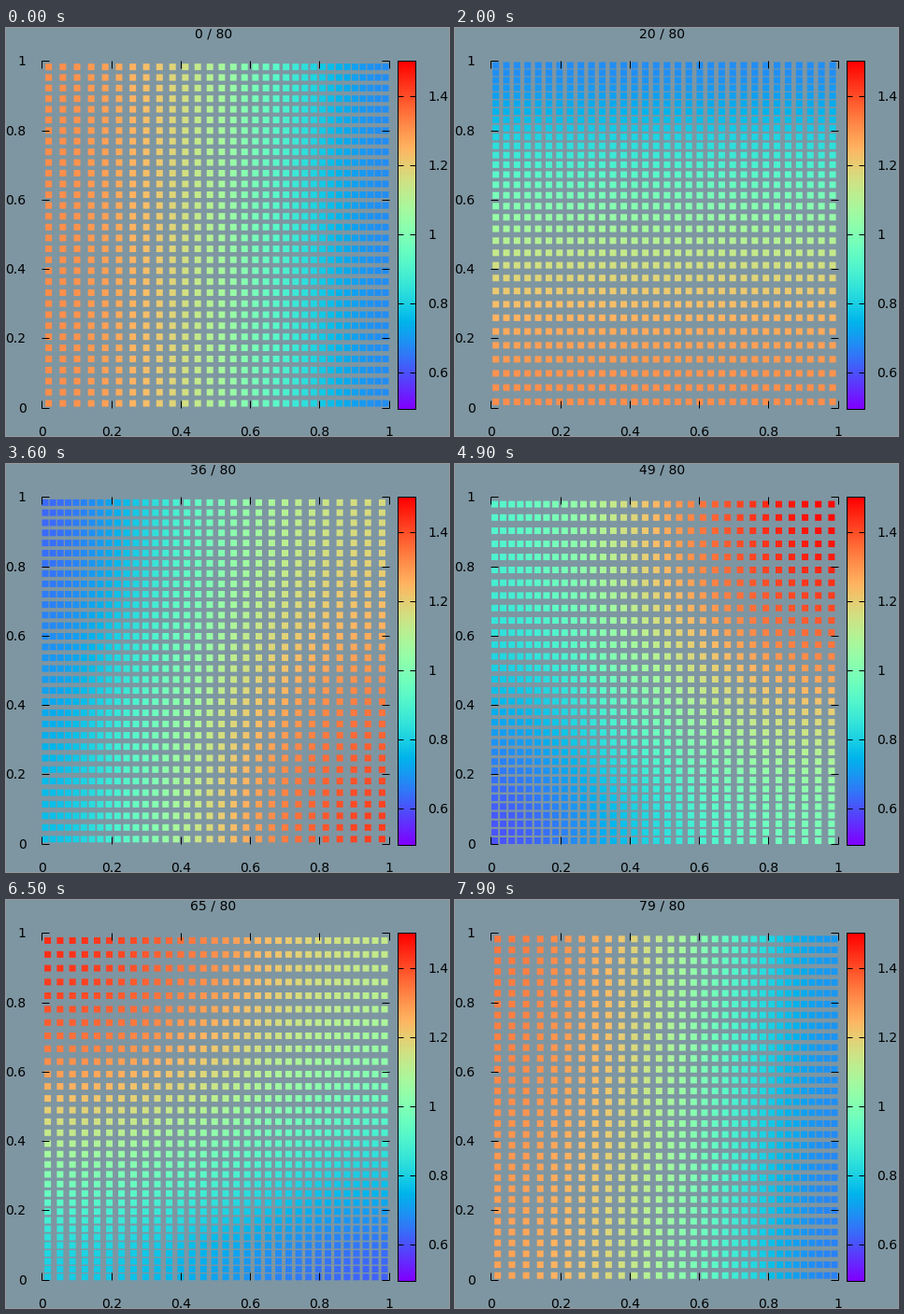
A matplotlib script for the animation above (8 s loop, 474x437 px).

```python
import numpy as np
import matplotlib.pyplot as plt
from matplotlib.animation import FuncAnimation
from matplotlib.collections import LineCollection, PolyCollection

W, H, DPI = 474, 437, 100
FRAMES, INTERVAL = 80, 100
CELLS = 32
LEFT, BOTTOM, SIDE = 38, 408, 372
TOP = BOTTOM - SIDE
AXIS_LEFT, AXIS_BOTTOM, AXIS_SIDE = 38.5, 406.6, 371.2
AXIS_RIGHT, AXIS_TOP = AXIS_LEFT + AXIS_SIDE, AXIS_BOTTOM - AXIS_SIDE
BAR_LEFT, BAR_RIGHT = 419, 438
HALF = 3.5          # half the side of a marker
WARP = 0.1          # displacement amplitude of the grid
FONT = dict(family="DejaVu Sans", size=14 * 72 / DPI, color="black")


def rainbow(value):
    """Map values in 0.5..1.5 to violet-blue-green-orange-red."""
    t = np.clip(np.asarray(value) - 0.5, 0, 1)
    rgb = [np.abs(2 * t - 0.5), np.sin(np.pi * t), np.cos(np.pi * t / 2)]
    return np.clip(np.stack(rgb, axis=-1), 0, 1)


fig = plt.figure(figsize=(W / DPI, H / DPI), dpi=DPI, facecolor="#7e96a2")
ax = fig.add_axes([0, 0, 1, 1])
ax.set_xlim(0, W)
ax.set_ylim(H, 0)
ax.axis("off")


def label(x, y, text, align):
    return ax.text(x, y, text, ha=align, va="baseline", **FONT)


def add_lines(segments):
    ax.add_collection(LineCollection(segments, colors="black", zorder=3,
                                     linewidths=72 / DPI, snap=True,
                                     capstyle="butt"))


def draw_axes():
    ticks = []
    for i in range(6):
        x = AXIS_LEFT + AXIS_SIDE * i / 5
        y = AXIS_BOTTOM - AXIS_SIDE * i / 5
        ticks += [[(x, AXIS_BOTTOM), (x, AXIS_BOTTOM - 8)],
                  [(x, AXIS_TOP), (x, AXIS_TOP + 8)],
                  [(AXIS_LEFT, y), (AXIS_LEFT + 8, y)],
                  [(AXIS_RIGHT, y), (AXIS_RIGHT - 8, y)]]
        name = f"{i / 5:g}"
        label(x, 437, name, "center")
        label(21.5, round(y + 5), name, "right")
    add_lines(ticks)


def draw_colorbar():
    ramp = rainbow(np.linspace(1.5, 0.5, SIDE))[:, None]
    ax.imshow(ramp, extent=(BAR_LEFT, BAR_RIGHT, BOTTOM, TOP),
              aspect="auto", interpolation="nearest", zorder=1)
    x0, x1, y0, y1 = BAR_LEFT + .5, BAR_RIGHT + .5, BOTTOM, AXIS_TOP
    lines = [[(x0, y0), (x1, y0), (x1, y1), (x0, y1), (x0, y0)]]
    for value in (0.6, 0.8, 1, 1.2, 1.4):
        y = AXIS_BOTTOM - AXIS_SIDE * (value - 0.5)
        lines += [[(x0, y), (x0 + 6, y)], [(x1, y), (x1 - 6, y)]]
        label(451, round(y + 5), f"{value:g}", "left")
    add_lines(lines)


draw_axes()
draw_colorbar()
ax.set_xlim(0, W)
ax.set_ylim(H, 0)

title = label(222, 11, "", "center")
markers = PolyCollection([], linewidths=0, edgecolors="none", zorder=2,
                         snap=False)
ax.add_collection(markers, autolim=False)

u = (np.arange(CELLS) + 0.5) / CELLS
corners = HALF * np.array([(-1, -1), (1, -1), (1, 1), (-1, 1)])


def phase(step):
    angle = 2 * np.pi * step / FRAMES
    return WARP * np.cos(angle), WARP * np.sin(angle)


def displaced(amount):
    return u + amount * np.sin(np.pi * u)


def stretch(amount):
    return 1 + amount * np.pi * np.cos(np.pi * u)


def update(k):
    # Positions run one step ahead of the colours.
    ax_next, ay_next = phase(k + 1)
    px, py = np.meshgrid(LEFT + SIDE * displaced(ax_next),
                         BOTTOM - SIDE * displaced(ay_next))
    centers = np.stack([px.ravel(), py.ravel()], axis=-1)
    markers.set_verts(centers[:, None] + corners)

    ax_now, ay_now = phase(k)
    area = np.outer(stretch(ay_now), stretch(ax_now))
    markers.set_facecolor(rainbow(area.ravel()))
    title.set_text(f"{k} / {FRAMES}")
    return markers, title


anim = FuncAnimation(fig, update, frames=FRAMES, interval=INTERVAL,
                     repeat=True, repeat_delay=0)
plt.show()
```
